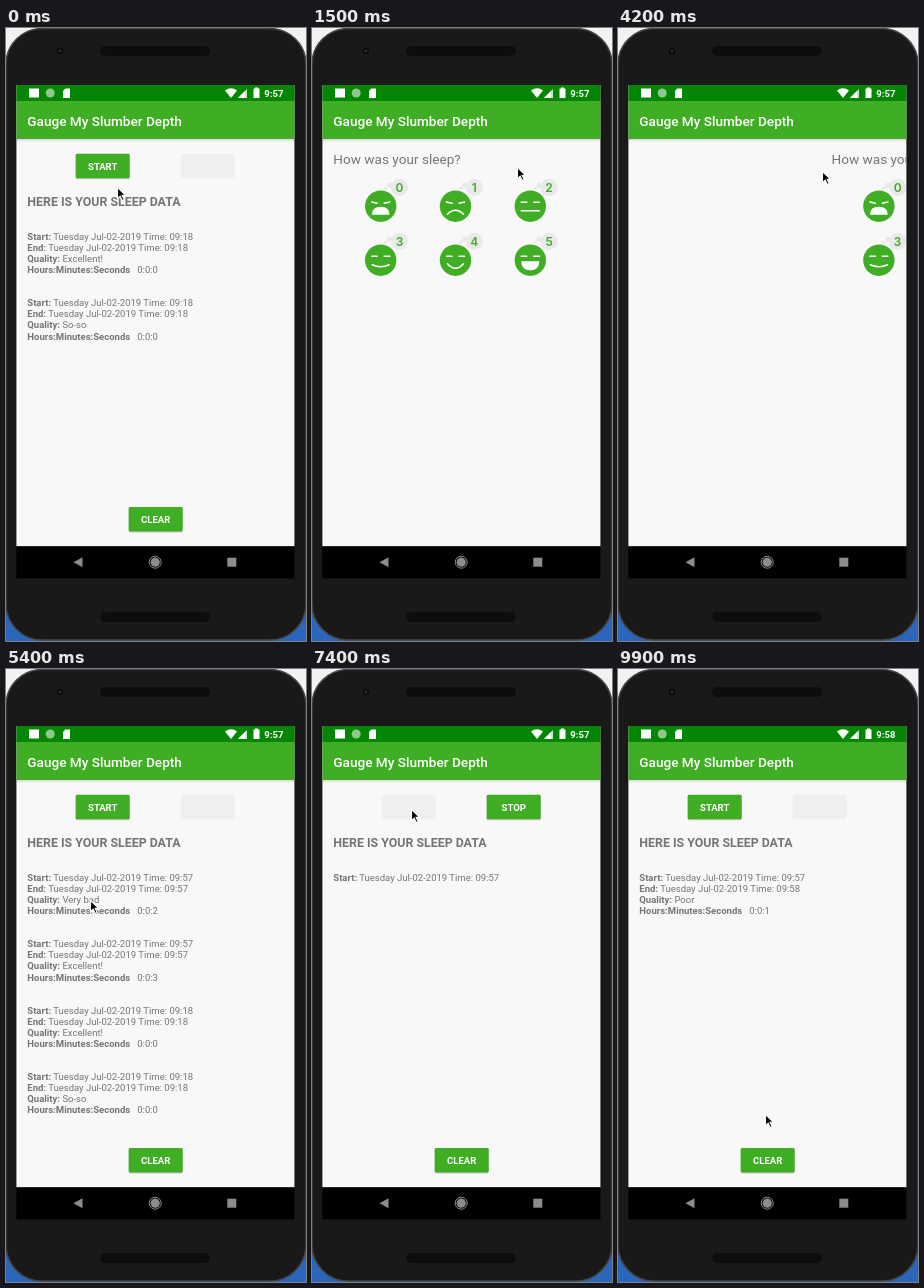
Animation of 300x613 px, one loop 10000 ms. Source, as an HTML page:

```html
<!DOCTYPE html>
<html lang="en">
<head>
<meta charset="utf-8">
<title>Sleep tracker</title>
<style>
html, body { margin: 0; width: 100%; height: 100%; overflow: hidden; background: #f2f2f2; }
svg { display: block; }
text { font: 9.53px Roboto, sans-serif; fill: #757575; white-space: pre; }
.b { font-weight: 700; }
.title { font-size: 13.6px; font-weight: 500; fill: #fff; }
.white { fill: #fff; }
.big { font-size: 13.6px; }
.head { font-size: 12.38px; font-weight: 700; }
.digit { font: 600 12px Inter, sans-serif; fill: #40ae25; text-anchor: middle; }
.button { font-weight: 700; fill: #fff; text-anchor: middle; }
.line { fill: none; stroke: #fff; stroke-width: 1.5; stroke-linecap: round; }
</style>
</head>
<body>
<svg width="300" height="613" viewBox="0 0 300 613">
  <defs>
    <clipPath id="content"><rect x="10.4" y="57" width="278" height="461.4"/></clipPath>
    <linearGradient id="shade" x2="0" y2="1">
      <stop stop-color="#000" stop-opacity=".14"/><stop offset="1" stop-color="#000" stop-opacity="0"/>
    </linearGradient>
  </defs>

  <!-- Phone -->
  <rect width="300" height="613" fill="#f2f2f2"/>
  <rect y="545" width="300" height="68" fill="#2c66bb"/>
  <rect x="0" y=".5" width="300" height="611.5" rx="36" fill="#191919" stroke="#444" stroke-width="1.500"/>
  <rect x="94" y="18" width="110" height="10" rx="5" fill="#0d0d0d"/>
  <rect x="94" y="584" width="110" height="10" rx="5" fill="#0d0d0d"/>
  <circle cx="54" cy="23" r="3.5" fill="#0d0d0d"/>
  <circle cx="54" cy="23" r="1.2" fill="#333"/>

  <!-- App -->
  <rect x="10.400" y="57" width="278" height="461.400" fill="#f8f8f8"/>
  <g clip-path="url(#content)">
    <g id="tracker"></g>
    <g id="quality"><text class="big" x="21.300" y="136.200">How was your sleep?</text></g>
    <g id="snack">
      <rect x="10" y="485.500" width="279" height="33" fill="#2d2d2d"/>
      <text class="white" x="27.200" y="505.500">All your data is gone forever.</text>
    </g>
  </g>
  <rect x="10.400" y="111" width="278" height="3" fill="url(#shade)"/>
  <rect x="10.400" y="73" width="278" height="38" fill="#40ae25"/>
  <text class="title" x="21.300" y="97.500">Gauge My Slumber Depth</text>

  <!-- Status bar -->
  <rect x="10.400" y="57" width="278" height="16" fill="#048604"/>
  <g fill="#fff">
    <rect x="23" y="60.5" width="10" height="9"/>
    <circle cx="44.200" cy="65" r="4.500" fill="#8fc78f"/>
    <path d="M59.3 60.5H64v9.5h-7v-7z"/>
    <path d="M219 62.5q6-4.500 12 0l-6 7.500z"/>
    <path d="M241 61v9h-9z" fill="#c9e5c9"/>
    <path d="M239 63v7h-7z"/>
    <path d="M249 60.500v-1h3v1h1.500v9.500h-6v-9.500z"/>
  </g>
  <text id="clock" class="white b" x="258.300" y="68.600"></text>

  <!-- Navigation bar -->
  <rect x="10.400" y="518.400" width="278" height="32" fill="#000"/>
  <g fill="#8c8c8c">
    <path d="M67.500 534.200l9-5v10z"/>
    <circle cx="149.200" cy="534.200" r="4.600"/>
    <circle cx="149.200" cy="534.200" r="6" fill="none" stroke="#8c8c8c"/>
    <rect x="221.300" y="529.700" width="9" height="9"/>
  </g>

  <path id="cursor" d="M.5.500v11.200l2.700-2.500 2 4.400 2-.9-2-4.300h3.500z" fill="#000" stroke="#fff" stroke-width="1.100"/>
</svg>
<script>
const LOOP = 10000, FRAME = 100, SLIDE = 240, WIDTH = 278;
const GREEN = '#40ae25';
const el = id => document.getElementById(id);

const night = (start, end, quality, length) => ({ start, end, quality, length });
const open = { start: '09:57' };
const old = [night('09:18', '09:18', 'Excellent!', '0:0:0'), night('09:18', '09:18', 'So-so', '0:0:0')];
const first = [night('09:57', '09:57', 'Excellent!', '0:0:3'), ...old];
const second = [night('09:57', '09:57', 'Very bad', '0:0:2'), ...first];
const last = [night('09:57', '09:58', 'Poor', '0:0:1')];

// Each scene is a list of nights; null means the quality screen.
const scenes = [
  [0, old], [300, [open, ...old]], [1100, null],
  [2300, first], [3300, [open, ...first]], [4110, null],
  [5000, second], [6100, []], [7300, [open]], [8105, null], [8600, last]
];

const pointer = [
  [0, 111, 159], [300, 103, 140], [400, 103, 140], [1000, 205, 139], [1500, 205, 139],
  [2000, 217, 232], [2300, 217, 232], [2900, 102, 140], [3300, 102, 140],
  [3800, 204, 143], [4200, 204, 143], [4800, 72, 181], [5100, 72, 181], [5400, 84, 231],
  [5900, 145, 490], [6150, 145, 490], [6500, 62, 519], [6700, 62, 519], [7200, 99, 140],
  [7600, 99, 140], [7950, 200, 140], [8200, 200, 140], [8500, 144, 180], [8700, 144, 180],
  [9600, 147, 445], [LOOP, 147, 445]
];

function button(x, y, label, enabled) {
  const box = (dy, fill) => `<rect x="${x}" y="${y + dy}" width="54" height="24.500" rx="1.400" fill="${fill}"/>`;
  return enabled
    ? box(1, '#0003') + box(0, GREEN) + `<text class="button" x="${x + 27}" y="${y + 15.8}">${label}</text>`
    : box(0, '#efefef');
}

function drawTracker(nights) {
  const running = nights.length > 0 && !nights[0].end;
  let svg = button(69.7, 125.8, 'START', !running) + button(174.7, 125.8, 'STOP', running)
    + button(122.7, 479, 'CLEAR', nights.length > 0)
    + '<text class="head" x="21.300" y="178.300">HERE IS YOUR SLEEP DATA</text>';
  let y = 212;
  const line = (label, value) => {
    svg += `<text x="21.300" y="${y}"><tspan class="b">${label}</tspan>${value}</text>`;
    y += 11.06;
  };
  for (const n of nights) {
    line('Start:', ` Tuesday Jul-02-2019 Time: ${n.start}`);
    if (n.end) {
      line('End:', ` Tuesday Jul-02-2019 Time: ${n.end}`);
      line('Quality:', ` ${n.quality}`);
      line('Hours:Minutes:Seconds', `\u00a0\u00a0\u00a0${n.length}`);
      y += 11.06;
    }
    y += 11.06;
  }
  el('tracker').innerHTML = svg;
}

const slanted = 'M-9-4.300l5.500 1.300M9-4.300l-5.500 1.300';
const flat = 'M-9-4h5.500M9-4h-5.500';
const faces = [
  [slanted, 'M-8.800 8.500q0-8 8.800-8t8.800 8z', true],
  [slanted, 'M-8 8q8-8 16 0'],
  [flat, 'M-9 4.500h18'],
  [flat, 'M-8.500 4.500q8.500 4 17 0'],
  [flat, 'M-8 3.500q8 9 16 0'],
  [flat, 'M-9 1h18q0 9-9 9t-9-9z', true]
];
el('quality').innerHTML += faces.map(([eyes, mouth, filled], i) => `
  <g transform="translate(${68.7 + i % 3 * 74.8} ${178.2 + (i > 2) * 54})">
    <g fill="#e9e9e9"><circle cx="18.800" cy="-18.700" r="8.500"/><circle cx="9" cy="-21" r="2.600"/><circle cx="5" cy="-18" r="1.600"/></g>
    <text class="digit" x="18.800" y="-14.300">${i}</text>
    <circle r="15.700" fill="${GREEN}"/>
    <path class="line" d="${eyes}"/>
    <path ${filled ? 'fill="#fff"' : 'class="line"'} d="${mouth}"/>
  </g>`).join('');

const clamp = v => Math.min(1, Math.max(0, v));
const ease = p => (1 - Math.cos(Math.PI * clamp(p))) / 2;
const move = (id, x, y) => el(id).setAttribute('transform', `translate(${x} ${y})`);
const show = (id, on) => { el(id).style.display = on ? '' : 'none'; };
let current;

function render(time) {
  const t = Math.floor(time % LOOP / FRAME) * FRAME;
  const scene = scenes.findLast(s => s[0] <= t);
  const [since, nights] = scene;
  if (scene !== current) {
    current = scene;
    show('tracker', nights);
    show('quality', !nights);
    if (nights) drawTracker(nights);
  }
  move('quality', WIDTH * (1 - ease((t - since) / SLIDE)), 0);
  move('snack', 0, 33 * (1 - ease((t - 6100) / 150) + ease((t - 6980) / 150)));
  el('clock').textContent = t < 7700 ? '9:57' : '9:58';

  const i = pointer.findIndex(p => p[0] > t);
  const [t0, x0, y0] = pointer[i - 1], [t1, x1, y1] = pointer[i];
  const p = ease((t - t0) / (t1 - t0));
  move('cursor', x0 + (x1 - x0) * p, y0 + (y1 - y0) * p);
}

const begin = performance.now();
(function tick() {
  render(performance.now() - begin);
  requestAnimationFrame(tick);
})();
</script>
</body>
</html>
```
